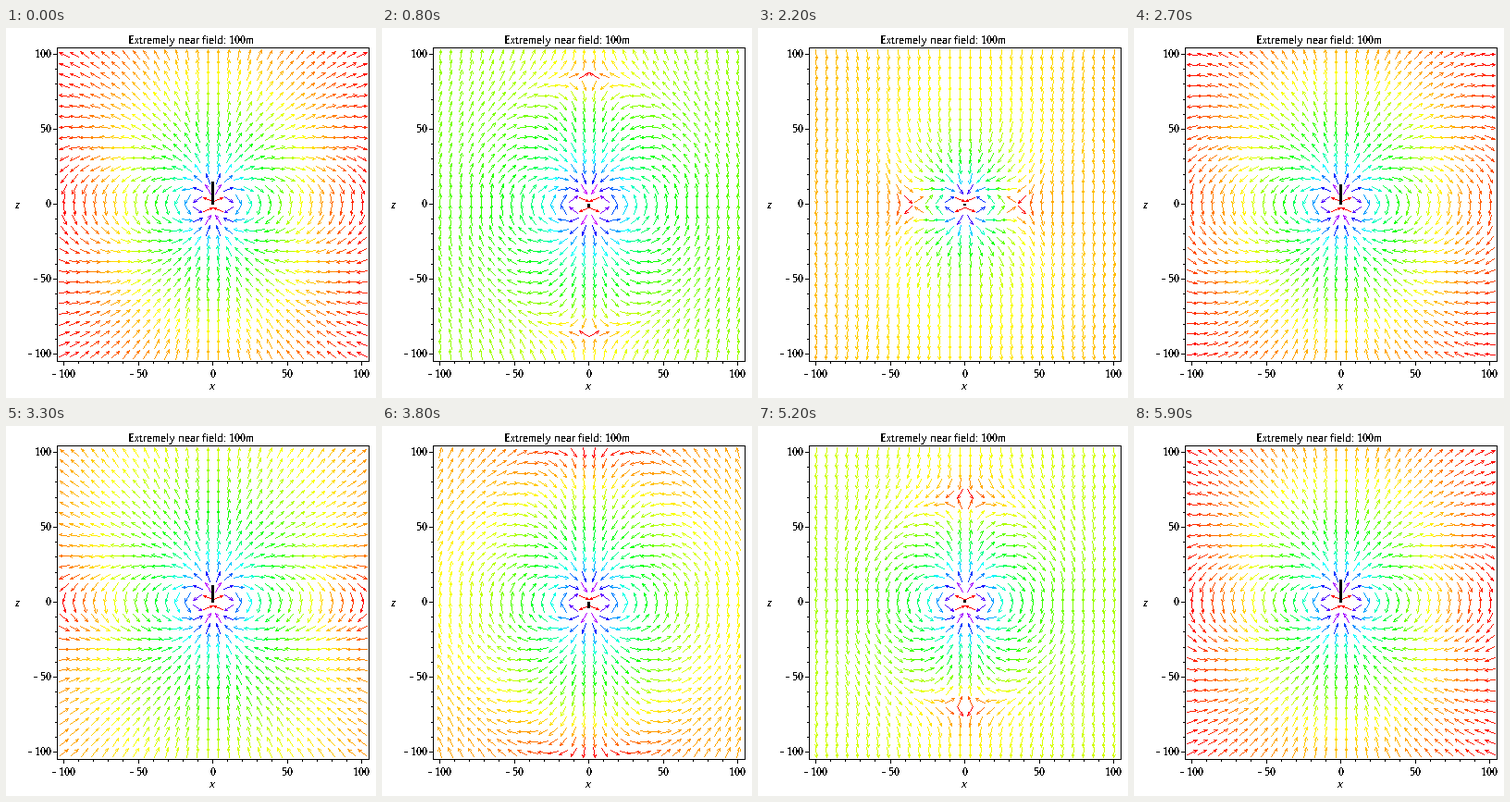
A matplotlib script that plays this animation: 400x400 px, repeating every 6000 ms.

```python
import numpy as np
import matplotlib.pyplot as plt
from matplotlib.animation import FuncAnimation
from matplotlib.colors import hsv_to_rgb

SIZE = 400
DPI = 100
PX = 72 / DPI                      # points per pixel
LEFT, RIGHT, TOP, BOTTOM = 55, 392, 21, 360
CX, CY = (LEFT + RIGHT) / 2, (TOP + BOTTOM) / 2
SCALE_X, SCALE_Y = 1.61, 1.62      # pixels per metre

FRAMES = 60
PERIODS = 2
K = 0.0096                         # wave number, 1/m
GRID = 30
MOMENT = 15                        # drawn length of the dipole, m
ARROW = 200 / (GRID - 1)
BARB, BARB_HALF = 1.9, 0.75        # arrow head, m

plt.rcParams.update({
    "font.family": "Liberation Serif",
    "text.antialiased": False,
    "text.hinting": "default",
    "text.hinting_factor": 1,
})
fig = plt.figure(figsize=(SIZE / DPI, SIZE / DPI), dpi=DPI, facecolor="white")
ax = fig.add_axes([0, 0, 1, 1])
ax.axis("off")
canvas = ax.imshow(np.ones((SIZE, SIZE, 3)), extent=(0, SIZE, SIZE, 0),
                   interpolation="nearest", aspect="auto", zorder=0)
ax.set_xlim(0, SIZE)
ax.set_ylim(SIZE, 0)


def to_px(x, z):
    return CX + SCALE_X * x, CY - SCALE_Y * z


def line(xs, ys):
    ax.plot(xs, ys, color="black", lw=PX, antialiased=False,
            solid_capstyle="projecting", solid_joinstyle="miter")


def label(x, y, text, ha="center", **style):
    ax.text(x, y, text, ha=ha, va="baseline", fontsize=13 * PX, **style)


def draw_axes():
    line([LEFT, RIGHT, RIGHT, LEFT, LEFT], [TOP, TOP, BOTTOM, BOTTOM, TOP])
    for v in range(-100, 101, 10):
        major = v % 50 == 0
        size = 4 if major else 2
        px, py = np.floor(to_px(v, v))
        line([px, px], [BOTTOM, BOTTOM + size])
        line([LEFT - size, LEFT], [py, py])
        if major:
            text = str(v).replace("-", "- ")
            label(px + 0.5, 378, text)
            label(49, py + 4, text, ha="right")
    label(199.5, 17, "Extremely near field: 100m")
    label(223.5, 391, "x", style="italic")
    label(12.5, 195, "z", style="italic")


axis = np.linspace(-100, 100, GRID)
X, Z = (g.ravel() for g in np.meshgrid(axis, axis))
R = np.hypot(X, Z)
SIN, COS = X / R, Z / R


def field(phase):
    """Electric field of an oscillating point dipole, with retardation."""
    y = K * R
    p = np.cos(phase - y)
    near = p - y * np.sin(phase - y)
    radial = 2 * COS * near / R**3
    polar = SIN * (near - y**2 * p) / R**3
    return radial * SIN + polar * COS, radial * COS - polar * SIN


def hues(mag):
    level = np.log(mag)
    h = (level - level.min()) / (level.max() - level.min())
    return hsv_to_rgb(np.stack([h, np.ones_like(h), np.ones_like(h)], axis=-1))


def draw_lines(img, start, end, colors):
    """Paint one-pixel lines, one per row of start and end."""
    a, b = (np.floor(np.stack(to_px(*p)) + 0.5) for p in (start, end))
    steps = np.maximum(np.abs(b - a).max(axis=0), 1)
    for i in range(int(steps.max()) + 1):
        t = np.minimum(i / steps, 1)
        col, row = np.floor(a + (b - a) * t + 0.5).astype(int)
        img[row, col] = colors


def draw_arrows(img, phase):
    ex, ez = field(phase)
    mag = np.hypot(ex, ez)
    ux, uz = ex / mag, ez / mag
    colors = hues(mag)

    def point(along, side):
        return X + along * ux - side * uz, Z + along * uz + side * ux

    tip = point(ARROW / 2, 0)
    draw_lines(img, point(-ARROW / 2, 0), tip, colors)
    for side in (-BARB_HALF, BARB_HALF):
        draw_lines(img, point(ARROW / 2 - BARB, side), tip, colors)


def draw_dipole(img, phase):
    x, end = to_px(0, MOMENT * np.cos(phase))
    top, bottom = int(min(CY, end)), int(max(CY, end))
    col = int(x)
    img[top:bottom + 1, col - 1:col + 2] = 0


def update(i):
    phase = 2 * np.pi * PERIODS * i / (FRAMES - 1)
    img = np.ones((SIZE, SIZE, 3))
    draw_arrows(img, phase)
    draw_dipole(img, phase)
    canvas.set_data(img)
    return canvas,


draw_axes()
anim = FuncAnimation(fig, update, frames=FRAMES, interval=100,
                     repeat=True, repeat_delay=0, blit=False)
plt.show()
```
